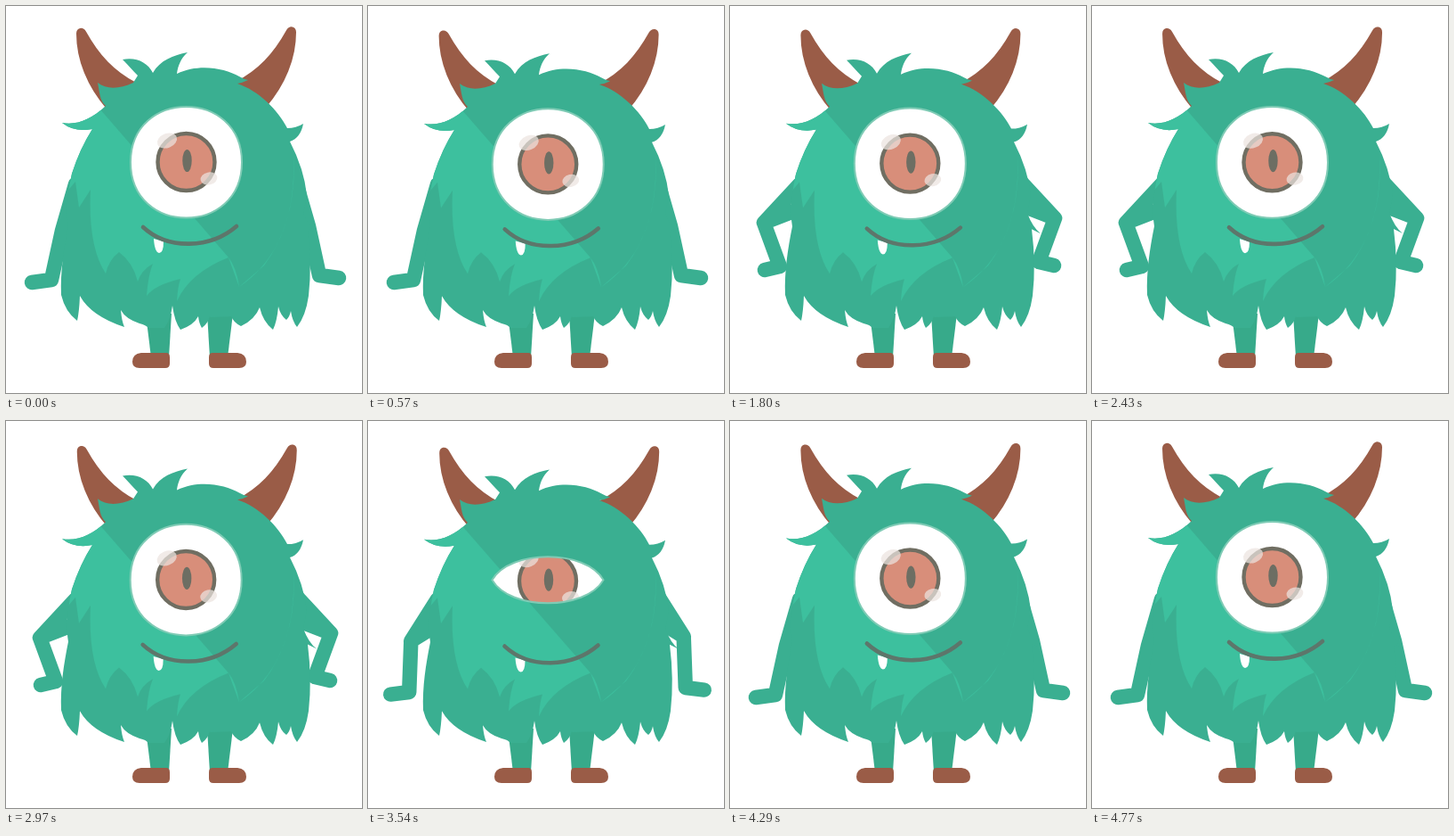
An HTML page that plays this animation: 400 by 434 pixels, repeating every 4.83 s.

```html
<!DOCTYPE html>
<html lang="en">
<head>
<meta charset="utf-8">
<title>Green monster</title>
<style>
  html, body { margin: 0; width: 100%; height: 100%; overflow: hidden; background: #fff; }
  svg { display: block; width: 100%; height: 100%; }
  .brown { fill: #9a5c47; stroke: #9a5c47; stroke-width: 2; stroke-linejoin: round; }
  .leg { fill: #37aa8a; }
  .shade { fill: #3aaf91; }
  .light { fill: #3dc09e; }
  .arm { fill: none; stroke: #3aaf91; stroke-width: 16.5; stroke-linecap: round; stroke-linejoin: round; }
  .glint { fill: #ece3e0; opacity: .72; }
</style>
</head>
<body>
<svg viewBox="0 0 400 434">
  <defs>
    <clipPath id="lids"><path id="lidClip"/></clipPath>
    <clipPath id="fur"><use href="#coat"/></clipPath>
  </defs>

  <g id="leg">
    <path class="leg" d="M157 345H186L183 394H163Z"/>
    <path class="brown" d="M152 390H180Q183 390 183 394V401Q183 405 179 405H150Q143 405 143 399Q143 391 152 390Z"/>
  </g>
  <use href="#leg" transform="matrix(-1 0 0 1 412 0)"/>

  <path class="arm" id="arm"/>
  <use href="#arm" transform="matrix(-1 0 0 1 403 -5)"/>

  <g id="horns">
    <path class="brown" id="horn" d="M80 31C80 25 86 24 89 29C104 56 121 74 146 87L114 115C92 90 80 60 80 31Z"/>
    <use href="#horn" transform="matrix(-1 0 0 1 405 -1.5)"/>
  </g>

  <g id="body">
    <path id="coat" class="shade"/>
    <path id="bright" class="light" clip-path="url(#fur)"/>
  </g>

  <g id="face">
    <path d="M166 261L177 264Q177 277 172 277Q167 276 166 261Z" fill="#fff"/>
    <path d="M154 248C182 274 230 272 259 247" fill="none" stroke="#5d766b" stroke-width="4.6" stroke-linecap="round"/>
    <g clip-path="url(#lids)">
      <rect x="130" y="105" width="145" height="140" fill="#fff"/>
      <circle cx="202.5" cy="175" r="32" fill="#d88e7a" stroke="#706e62" stroke-width="4.4"/>
      <ellipse cx="203.5" cy="173.5" rx="5.2" ry="12.6" fill="#6d6e63"/>
      <ellipse class="glint" cx="181" cy="151" rx="11.5" ry="8" transform="rotate(-22 181 151)"/>
      <ellipse class="glint" cx="228" cy="193.5" rx="9.5" ry="7" transform="rotate(-12 228 193.5)"/>
    </g>
    <path id="lidLine" fill="none" stroke="#7fcbb5" stroke-width="2"/>
  </g>
</svg>
<script>
const LOOP = 4830, FRAME = 56.25, TICK = 30;
const el = id => document.getElementById(id);
const mix = (a, b, x) => a + (b - a) * x;
const ramp = (t, a, b) => (1 - Math.cos(Math.PI * Math.min(1, Math.max(0, (t - a) / (b - a))))) / 2;
const pulse = (t, a, b, c, d) => ramp(t, a, b) - ramp(t, c, d);

// Fur edge through tips, each followed by the notch after it.
function fringe(from, tufts) {
  const side = (n, t) => `${mix(n[0], t[0], 0.25)} ${mix(n[1], t[1], 0.65)}`;
  let d = '', last = from;
  for (const [tx, ty, nx, ny] of tufts) {
    const tip = [tx, ty], notch = [nx, ny];
    d += `Q${side(last, tip)} ${tip}Q${side(notch, tip)} ${notch}`;
    last = notch;
  }
  return d;
}

const HAIR = 'M63 131C80 134 96 127 112 112C105 106 105 95 103 86C113 94 128 93 143 86' +
  'L148 78C142 72 137 66 131 60C146 57 159 63 165 75C173 61 188 55 204 52C196 59 193 68 192 76';
const RIGHT_SIDE = 'C217 64 246 70 262 79Q267 82 272 83Q266 86 260 87C284 95 306 117 316 137' +
  'Q326 137 334 132Q331 148 319 152Q335 183 338 212L334 232Q340 248 349 255L339 250Q344 290 340 325';
const LEFT_SIDE = 'C61 297 65 272 70 247Q66 224 74 188Q83 160 97 138Q77 142 63 131Z';

const hem = fringe([340, 325], [
  [327, 360, 320, 342], [315, 352, 306, 337], [300, 363, 285, 338], [264, 359, 253, 348],
  [230, 349, 229, 348], [220, 361, 216, 348], [196, 363, 187, 336], [178, 361, 160, 361],
  [150, 356, 129, 341], [133, 360, 83, 325], [80, 353, 62, 324]
]);
el('coat').setAttribute('d', HAIR + RIGHT_SIDE + hem + LEFT_SIDE);

const belly = fringe([112, 300], [
  [127, 276, 148, 309], [165, 289, 158, 325], [196, 306, 192, 331], [250, 282, 262, 315]
]);
el('bright').setAttribute('d', 'M40 40H345V170L323 165Q328 240 290 291L262 315L250 282' +
  'M40 40V218H60L78 197L82 226L95 206Q92 270 112 300' + belly + 'Q328 270 323 165L345 170V40Z');

// u: 0 hanging, 1 on the hip; the hand swings outwards in between.
function armPath(u) {
  const swing = Math.sin(Math.PI * u);
  const elbow = [mix(63, 38, u), mix(252, 243, u)];
  const wrist = [mix(51, 56, u) - 8 * swing, mix(307, 292, u) + 6 * swing];
  const hand = [mix(29, 39, u) - 10 * swing, mix(310, 296, u) + 5 * swing];
  return `M82 226L${elbow}L78 200L${elbow}L${wrist}L${hand}`;
}

function lidPath(close) {
  const l = 140, r = 265, y = 175.2 - 1.5 * close;
  const inset = 20 * close, c = mix(62.3, 26, close) * 4 / 3;
  return `M${l} ${y}C${l + inset} ${y - c} ${r - inset} ${y - c} ${r} ${y}` +
    `C${r - inset} ${y + c} ${l + inset} ${y + c} ${l} ${y}Z`;
}

// Steps of 56.25 ms, rounded to the 30 ms tick.
const start = k => Math.round(k * FRAME / TICK) * TICK;

function stepTime(t) {
  let k = Math.min(Math.floor(t / FRAME) + 1, Math.floor(LOOP / FRAME));
  while (start(k) > t) k--;
  return start(k);
}

function draw(now) {
  const t = stepTime(now % LOOP);
  const sink = pulse(t, 0, 1110, 1110, 2270) + pulse(t, 2270, 3460, 3460, LOOP);
  const squint = pulse(t, 780, 1080, 1260, 1560) + pulse(t, 3180, 3440, 3540, 3840);
  const reach = pulse(t, 570, 1610, 3060, 4140);
  const lids = lidPath(squint);

  el('horns').setAttribute('transform', `translate(${1.2 * sink} ${5 * sink})`);
  el('body').setAttribute('transform', `translate(0 ${2.8 * sink}) scale(1 ${1 - 0.0077 * sink})`);
  el('face').setAttribute('transform', `translate(${-0.5 * sink} ${4.6 * sink})`);
  el('arm').setAttribute('d', armPath(reach));
  el('lidClip').setAttribute('d', lids);
  el('lidLine').setAttribute('d', lids);
}

const t0 = performance.now();
function loop() {
  draw(performance.now() - t0);
  requestAnimationFrame(loop);
}
loop();
</script>
</body>
</html>
```
